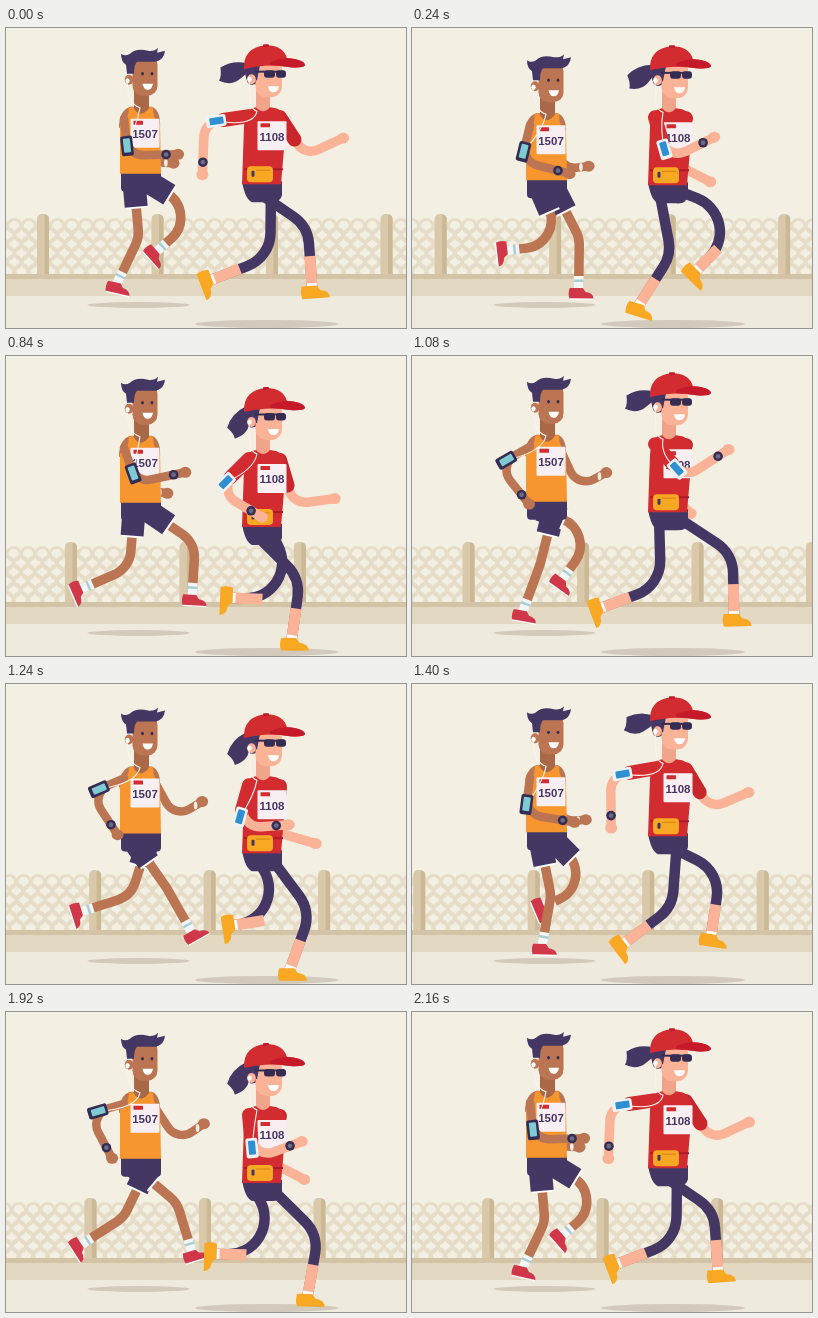
Animation of 400x300 px, one loop 2.2 s. Source, as an HTML page with a canvas:

```html
<!DOCTYPE html>
<html lang="en">
<head>
<meta charset="utf-8">
<title>Runners</title>
<style>
html, body { margin: 0; width: 100%; height: 100%; overflow: hidden; background: #f3efe2; }
canvas { display: block; width: 400px; height: 300px; }
</style>
</head>
<body>
<canvas id="stage" width="400" height="300"></canvas>
<script>
const c = document.getElementById('stage').getContext('2d');
const LOOP = 2200, STEP = 40, STRIDE = 18;
const NAVY = '#453763', RED = '#d32c30', WHITE = '#fff', ORANGE = '#f7952f', YELLOW = '#f8a823';
const GAP = 114.5, SPEED = 20.48;

// Cosine of the stride that peaks at the given step
const wave = (p, peak, times = 1) => Math.cos(2 * Math.PI * times * (p - peak) / STRIDE);

// Gait: ankle ellipse centre and size, leg reach, knee bend, lowest ankle height
const man = {
  skin: '#bb7552', shade: '#a96848', armW: 8.5, legW: 9.5,
  gait: { x: 130, y: 240, rx: 57, ry: 21, lift: 3, reach: 107, bend: 0.6, ground: 264, lag: 12 }
};
const woman = {
  skin: '#fbb398', shade: '#f2a48a', armW: 9.5, legW: 10.5,
  gait: { x: 247, y: 260, rx: 60, ry: 22.5, lift: 4, reach: 122, bend: 0.7, ground: 286, lag: 0 }
};

function box(x, y, w, h, r, color) {
  c.fillStyle = color;
  c.beginPath();
  c.roundRect(x, y, w, h, r);
  c.fill();
}
function oval(x, y, rx, ry, color) {
  c.fillStyle = color;
  c.beginPath();
  c.ellipse(x, y, rx, ry, 0, 0, 7);
  c.fill();
}
function shape(d, color) {
  c.fillStyle = color;
  c.fill(new Path2D(d));
}
function line(a, b, w, color, cap = 'butt') {
  c.strokeStyle = color;
  c.lineWidth = w;
  c.lineCap = cap;
  c.beginPath();
  c.moveTo(...a);
  c.lineTo(...b);
  c.stroke();
}
function placed([x, y], angle, draw) {
  c.save();
  c.translate(x, y);
  c.rotate(angle);
  draw();
  c.restore();
}
const mix = (a, b, u) => [a[0] + (b[0] - a[0]) * u, a[1] + (b[1] - a[1]) * u];
const dist = (a, b) => Math.hypot(b[0] - a[0], b[1] - a[1]);
const heading = (a, b) => Math.atan2(b[1] - a[1], b[0] - a[0]);

// A point at some length and angle (degrees forward of straight down)
function swing([x, y], len, deg) {
  const a = deg * Math.PI / 180;
  return [x + len * Math.sin(a), y + len * Math.cos(a)];
}

// Two straight parts joined by a round bend
function limb(a, k, b, w, color, r) {
  const turn = heading(k, a) - heading(k, b);
  const bend = Math.abs(Math.atan2(Math.sin(turn), Math.cos(turn)));
  const fit = Math.min(dist(a, k), dist(k, b)) * 0.95 * Math.tan(bend / 2);
  c.strokeStyle = color;
  c.lineWidth = w;
  c.lineCap = 'round';
  c.beginPath();
  c.moveTo(...a);
  c.arcTo(...k, ...b, Math.min(r, fit));
  c.lineTo(...b);
  c.stroke();
}

// The ankle rides a flattened ellipse, the knee bends as the leg shortens
function legPose({ x, y, rx, ry, lift, reach, bend, ground, lag }, hip, p) {
  const q = p - lag;
  const ankle = [x + rx * wave(q, 0.5), y + ry * wave(q, 4) + lift * wave(q, 4, 2)];
  const d = dist(hip, ankle), side = heading(hip, ankle) - Math.PI / 2;
  const out = bend * Math.sqrt(Math.max(20, reach * reach - d * d));
  const mid = mix(hip, ankle, 0.52);
  const knee = [mid[0] + out * Math.cos(side), mid[1] + out * Math.sin(side)];
  const free = Math.min(1, Math.max(0, (ground - ankle[1]) / 15));
  return { hip, knee, ankle, foot: (heading(knee, ankle) - Math.PI / 2) * free };
}

function shoe(p, angle, color, size) {
  placed(p, angle, () => {
    c.scale(size, size);
    shape('M-9 -2 L4 -2 L7 2 Q15 3 15 9 L-9 9 Q-11 4 -9 -2Z', color);
    if (color !== YELLOW) line([-9, 9], [15, 9], 1.3, WHITE);
  });
}

function manLeg(hip, p) {
  const { knee, ankle, foot } = legPose(man.gait, hip, p);
  limb(hip, knee, ankle, man.legW, man.skin, 28);
  const up = d => mix(ankle, knee, d / dist(knee, ankle));
  line(ankle, up(14), 9.8, '#f4f6f5');
  line(up(8), up(10.5), 9.8, '#a9cfd6');
  shoe(ankle, foot, '#d0384a', 1);
  const down = d => mix(hip, knee, d / dist(hip, knee));
  line(down(24), down(27), 20, WHITE);
  line(hip, down(25), 23, NAVY);
}

function womanLeg(hip, p) {
  const { knee, ankle, foot } = legPose(woman.gait, hip, p);
  limb(hip, knee, ankle, 10.5, NAVY, 36);
  const up = d => mix(ankle, knee, d / dist(knee, ankle));
  line(ankle, up(32), 11, woman.skin);
  line(ankle, up(5), 10, WHITE);
  shoe(ankle, foot, YELLOW, 1.15);
}

function arm(who, shoulder, [upper, upDeg], [fore, foreDeg], sleeve) {
  const elbow = swing(shoulder, upper, upDeg), hand = swing(elbow, fore, foreDeg);
  limb(shoulder, elbow, hand, who.armW, who.skin, 17);
  if (sleeve) line(shoulder, mix(shoulder, elbow, 0.58), 14, sleeve, 'round');
  oval(...hand, 6, 5.5, who.skin);
  return { band: mix(shoulder, elbow, 0.74), angle: heading(shoulder, elbow), wrist: mix(elbow, hand, 0.76) };
}

function phone({ band, angle }, frame, screen) {
  placed(band, angle, () => {
    box(-10, -6, 20, 12, 2, frame);
    box(-7.5, -3.5, 14, 7, 1, screen);
  });
}

function watch({ wrist }) {
  oval(...wrist, 4.8, 4.8, '#342c52');
  oval(...wrist, 2.4, 2.4, '#6d6a86');
}

function wire(ear, via, end) {
  c.strokeStyle = '#fbf3ea';
  c.lineWidth = 1.1;
  c.beginPath();
  c.moveTo(...ear);
  c.bezierCurveTo(ear[0] + 2, ear[1] + 16, via[0] - 10, via[1] - 4, ...via);
  c.quadraticCurveTo(via[0] - 3, via[1] + 16, ...end);
  c.stroke();
}

function bib(x, y, text) {
  box(x, y, 29, 29, 1, '#f8eff2');
  box(x + 3, y + 2, 9.5, 4, 0.5, RED);
  c.fillStyle = NAVY;
  c.font = 'bold 11.5px "Liberation Sans", Arial, sans-serif';
  c.textAlign = 'center';
  c.fillText(text, x + 14.5, y + 19.5);
}

function drawMan(p) {
  const dy = 2.2 + 4 * wave(p, 5.8, 2), beat = wave(p, 2.3);
  const far = arm(man, [148, 93 + dy], [43, 4 - 30 * beat], [32, 103 - 22 * beat]);
  oval(...far.wrist, 1.8, 4, '#f3eee8');
  manLeg([142, 154 + dy], p - STRIDE / 2);
  manLeg([128, 154 + dy], p);
  placed([0, dy], 0, () => {
    box(115, 142, 40, 22, 4, NAVY);
    shape('M124 79 Q113 83 113 100 L154 100 Q155 83 146 79Z', man.skin);
    box(128, 58, 15, 28, 6, man.shade);
    shape('M123 80 L127 79 Q134 93 144 79 L147 80 Q147 92 154 96 L155 146 L114 146 L114 97 Q123 92 123 80Z', ORANGE);
    bib(124.5, 91, '1507');
    box(126.5, 27, 25, 41, 10, man.skin);
    oval(123, 52, 4.3, 5, man.skin);
    shape('M121 46 L120 37 Q115 34 115 26 Q119 29 124 26 Q130 20 142 23 Q148 24 152 20 L151 25 L159 23 Q158 32 150 34 L131 34 Q128 37 128 46Z', NAVY);
    oval(136.5, 46, 1.4, 1.7, '#342c52');
    oval(146, 46, 1.4, 1.7, '#342c52');
    shape('M136.5 56 L147 56 Q146 62 141.7 62 Q137.5 62 136.5 56Z', WHITE);
    oval(121.5, 53, 2.2, 2.6, WHITE);
  });
  const near = arm(man, [118, 91 + dy], [37, 48 * beat - 27], [50, 65 + 38 * beat]);
  wire([121, 55 + dy], [134, 80 + dy], near.band);
  phone(near, '#342c52', '#7fcbd4');
  watch(near);
}

function drawWoman(p) {
  const dy = 8.5 + 9.5 * wave(p, 3.1, 2), beat = wave(p, 8.7);
  arm(woman, [274, 86 + dy], [46, 33 * wave(p, 0)], [42, 80 + 35 * wave(p, 0)], '#c8262c');
  placed([16, 0], 0, () => womanLeg([249, 158 + dy], p - STRIDE / 2));
  womanLeg([247, 158 + dy], p);
  placed([0, dy], 0, () => {
    placed([241, 36], -0.68 - 0.42 * wave(p, 3.5, 2), () =>
      shape('M2 -3 Q-10 -12 -25 -9 Q-27 0 -31 3 Q-22 12 -12 9 Q-4 7 2 3Z', NAVY));
    shape('M236 150 L276 150 L276 164 Q274 172 264 171 L246 171 Q239 168 236 150Z', NAVY);
    box(250, 56, 14, 26, 5, woman.shade);
    shape('M246 77 L250 76 Q257 84 264 76 L270 77 Q280 80 280 94 L275 153 L236 153 L238 95 Q239 80 246 77Z', RED);
    line([238, 138], [277, 138], 2, '#a91b2c');
    bib(251.5, 90, '1108');
    box(241, 135, 26, 16, 4, YELLOW);
    line([250, 139], [264, 139], 1.2, '#d98a17');
    box(245.5, 139.5, 3, 6, 1, NAVY);
    shape('M239 32 L254 30 L253 50 Q247 56 242 52 Q238 44 239 32Z', NAVY);
    box(249.5, 27, 26.5, 39, 11, woman.skin);
    shape('M241 34 L254 34 L251 49 L246 49Z', NAVY);
    oval(245.5, 48, 4.3, 5, woman.skin);
    box(258, 39, 11, 7.5, 3, '#342c52');
    box(270, 39, 10, 7.5, 3, '#342c52');
    line([249, 40.5], [278, 40.5], 2, '#342c52');
    shape('M262 55 L273 55 Q272 61 267.5 61 Q263 61 262 55Z', WHITE);
    shape('M238 38 Q237 16 260 14 Q277 14 281 27 Q298 28 299 34 Q297 37 284 36 Q262 32 238 38Z', RED);
    shape('M264 31 Q273 27 281 27 Q298 28 299 34 Q297 37 284 36 Q272 34 264 34Z', '#c61a2b');
    box(257, 13, 6, 2.5, 1, '#b81c2a');
    oval(243.5, 48, 2.2, 2.6, WHITE);
  });
  const fore = 75 + 63 * beat - 15 * wave(p, 8.7, 2);
  const near = arm(woman, [243, 85 + dy], [45, 62 * beat - 20], [52, fore], RED);
  wire([243, 50 + dy], [251, 80 + dy], near.band);
  phone(near, '#eef2f5', '#2f8fd0');
  watch(near);
}

function drawScene(frame) {
  box(0, 0, 400, 300, 0, '#f3efe2');
  const shift = ((37 - SPEED * frame) % GAP + GAP) % GAP - GAP;
  const pitch = GAP / 8;
  c.strokeStyle = '#e6ddc9';
  c.lineWidth = 3;
  for (let row = 0; row < 6; row++) {
    for (let x = shift + row % 2 * pitch / 2; x < 410; x += pitch) {
      c.beginPath();
      c.arc(x, 198 + row * 9, 6.6, 0, 7);
      c.stroke();
    }
  }
  for (let x = shift; x < 420; x += GAP) {
    box(x - 6, 186, 12, 64, [5, 5, 0, 0], '#d9c9aa');
    box(x + 1.5, 187, 4.5, 63, [0, 4, 0, 0], '#cbb894');
  }
  box(0, 246, 400, 6, 0, '#d3c4a8');
  box(0, 251, 400, 17, 0, '#e3d9c3');
  box(0, 268, 400, 32, 0, '#efeade');
  oval(132.5, 277, 51, 3, '#d2cabc');
  oval(261, 296, 72, 4, '#d2cabc');
}

const start = performance.now();
function tick() {
  const frame = Math.floor((performance.now() - start) % LOOP / STEP);
  const phase = frame % STRIDE;
  drawScene(frame);
  drawMan(phase);
  drawWoman(phase);
  requestAnimationFrame(tick);
}
tick();
</script>
</body>
</html>
```
